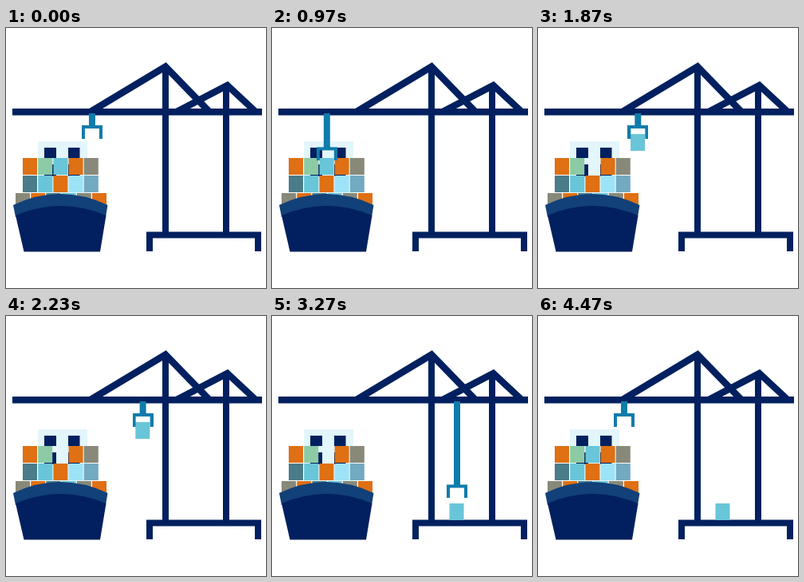
These frames come from a looping animation (326x326 px, 4.51 s). An HTML page:

```html
<!DOCTYPE html>
<html lang="en">
<head>
<meta charset="utf-8">
<title>Harbour crane</title>
<style>
  html, body { margin: 0; width: 100%; height: 100%; overflow: hidden; background: #fff; }
  svg { display: block; width: 100vw; height: 100vh; }
</style>
</head>
<body>
<svg viewBox="0 0 326 326">
  <defs>
    <clipPath id="below"><rect y="107" width="326" height="219"/></clipPath>
  </defs>

  <g id="ship">
    <path fill="#e3f6fb" d="M40 142h62v65H40z"/>
    <path fill="#02205f" d="M48 150h15v13H48zM78 150h14.5v13H78zM48 171h15v15H48zM78 171h14.5v15H78z"/>
    <g id="stack"></g>
    <rect id="spare" x="59.5" y="163" width="18" height="21" fill="#69c5d8" opacity="0"/>
    <path fill="#124078" d="M9 222Q68 194 127.500 222L125 237H12z"/>
    <path fill="#02205f" d="M12 235Q68 211 125.500 235L118 280.500H22.500z"/>
  </g>

  <g id="crane" fill="none" stroke="#02205f" stroke-width="8.500">
    <path d="M8 105.300H321"/>
    <path d="M106 105L200 48.500L254 104"/>
    <path d="M214 105L277.500 72L312 104"/>
    <path stroke-width="8" d="M200 48V259M276 73V259"/>
    <path stroke-width="8" d="M180 280V259.500H316V280"/>
  </g>

  <rect id="cargo" x="-9" width="18" height="21" fill="#69c5d8"/>
  <g clip-path="url(#below)">
    <path id="claw" fill="#0f7cab" d="M-4 0H4V122H13V139H9V126H-9V139H-13V122H-4z"/>
  </g>
</svg>
<script>
  const LOOP = 4510;
  const $ = id => document.getElementById(id);

  // Rows of containers: top, height, left edge, colours
  const ORANGE = '#df7013', GRAY = '#888979', SLATE = '#4b7c8a', BLUE = '#69c5d8', GREEN = '#8ccba5';
  const rows = [
    [163, 21, 21, [ORANGE, GREEN, null, ORANGE, GRAY]],
    [185, 21, 21, [SLATE, BLUE, ORANGE, '#9de3f7', '#73a9c1']],
    [207, 16, 12, [GRAY, ORANGE, SLATE, BLUE, GRAY, ORANGE]]
  ];
  for (const [y, height, left, colours] of rows) {
    colours.forEach((fill, i) => {
      if (!fill) return;
      const box = document.createElementNS('http://www.w3.org/2000/svg', 'rect');
      const attrs = { x: left + i * 19.2, y, width: 18, height, fill };
      for (const name in attrs) box.setAttribute(name, attrs[name]);
      $('stack').append(box);
    });
  }

  const play = (id, frames) => $(id).animate(frames, { duration: LOOP, iterations: Infinity });

  // Steps: time, x, y
  const move = (id, steps) => play(id, steps.map(([t, x, y]) =>
    ({ offset: t / LOOP, transform: `translate(${x}px, ${y}px)` })));

  move('claw', [
    [0, 108, 0], [360, 71.5, 0], [1030, 68.5, 30], [1430, 68.5, 0],
    [2700, 232, 0], [3185, 232, 102], [3880, 232, 0],
    [4470, 108, 0], [LOOP, 108, 0]
  ]);
  move('cargo', [
    [0, 68.5, 163], [1030, 68.5, 163], [1430, 68.5, 133],
    [2700, 231.5, 133], [3185, 231.5, 235], [LOOP, 231.5, 235]
  ]);
  play('spare', [
    { offset: 0, opacity: 0 }, { offset: 3270 / LOOP, opacity: 0 },
    { offset: 3700 / LOOP, opacity: 1 }, { offset: 1, opacity: 1 }
  ]);

  // All parts share one clock origin
  const start = document.timeline.currentTime;
  document.getAnimations().forEach(a => { a.startTime = start; });
</script>
</body>
</html>
```
